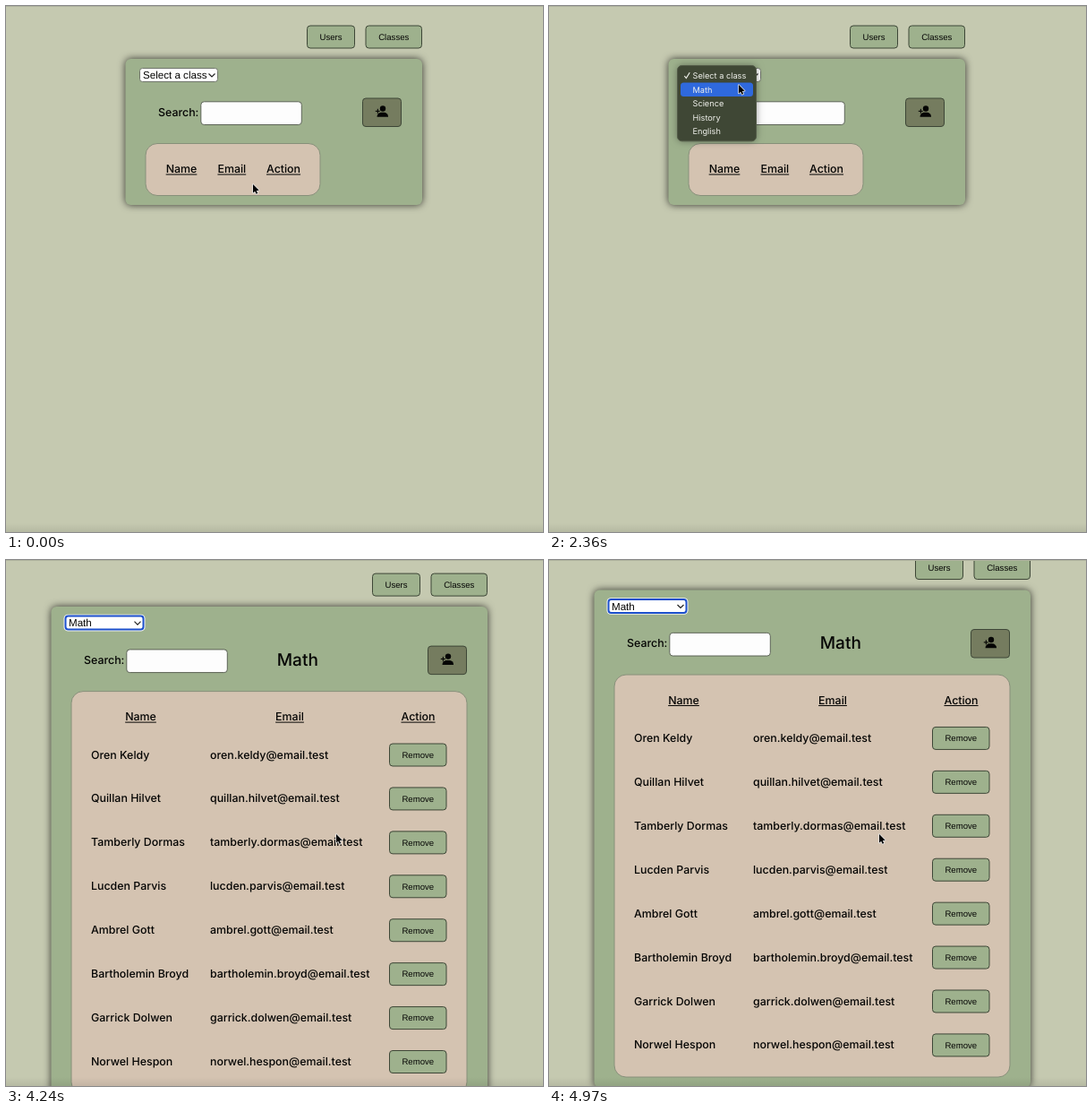
An HTML page with a canvas that plays this animation: 600 px wide and 587 px high, repeating every 5000 ms.

```html
<!DOCTYPE html>
<html lang="en">
<head>
<meta charset="utf-8">
<title>Class list</title>
<style>
  html, body { margin: 0; width: 100%; height: 100%; overflow: hidden; background: #c5c9b0; }
  canvas { display: block; }
</style>
</head>
<body>
<canvas id="stage" width="600" height="587"></canvas>
<script>
const ctx = document.getElementById('stage').getContext('2d');
ctx.textRendering = 'geometricPrecision';
const LOOP = 5000, MENU_OPEN = 700, HOVER = 1900, MENU_CLOSE = 2720, LOADED = 3000;
const GREEN = '#9eb18d', TAN = '#d4c3b1', INK = '#050504', EDGE = '#3d4636';
const ROUND = 'Inter, sans-serif', ARIAL = '"Liberation Sans", Arial, sans-serif';
const BODY = `500 12.4px ${ROUND}`;

const classes = ['Select a class', 'Math', 'Science', 'History', 'English'];
const students = ['Oren Keldy', 'Quillan Hilvet', 'Tamberly Dormas', 'Lucden Parvis',
  'Ambrel Gott', 'Bartholemin Broyd', 'Garrick Dolwen', 'Norwel Hespon'];

// Keys are [time, ...values]
const cursorKeys = [[60, 276, 199], [620, 214, 77], [1790, 214, 77], [2150, 212, 88],
  [3420, 212, 88], [3730, 227, 100], [4130, 369, 306]];
const scrollKeys = [[4130, 0], [4520, 32.5], [4740, 32.7], [5000, 24.7]];

function valueAt(keys, t) {
  const next = keys.findIndex(k => k[0] > t);
  if (next === 0) return keys[0].slice(1);
  if (next < 0) return keys[keys.length - 1].slice(1);
  const a = keys[next - 1], b = keys[next];
  const u = (t - a[0]) / (b[0] - a[0]), e = u * u * (3 - 2 * u);
  return a.slice(1).map((v, i) => v + (b[i + 1] - v) * e);
}

function box(x, y, w, h, r, fill, stroke, line = 1) {
  ctx.beginPath();
  ctx.roundRect(x, y, w, h, r);
  ctx.fillStyle = fill;
  ctx.fill();
  if (!stroke) return;
  ctx.shadowColor = 'transparent';
  ctx.strokeStyle = stroke;
  ctx.lineWidth = line;
  ctx.stroke();
}

function shadowBox(blur, color, ...args) {
  ctx.save();
  ctx.shadowBlur = blur;
  ctx.shadowColor = color;
  box(...args);
  ctx.restore();
}

function text(str, x, y, font, align = 'left', color = INK) {
  ctx.font = font;
  ctx.textAlign = align;
  ctx.fillStyle = color;
  ctx.fillText(str, x, y);
}

function polyline(points, color, width) {
  ctx.beginPath();
  points.forEach(p => ctx.lineTo(...p));
  ctx.strokeStyle = color;
  ctx.lineWidth = width;
  ctx.stroke();
}

function button(label, x, y, w) {
  box(x + .5, y + .5, w - 1, 25, 3.5, GREEN, EDGE);
  text(label, x + w / 2, y + 16.3, `9.6px ${ARIAL}`, 'center');
}

function heading(label, x) {
  text(label, x, 186.3, BODY, 'center');
  const half = ctx.measureText(label).width / 2;
  ctx.fillRect(x - half, 187.5, half * 2, 1);
}

function addButton(x) {
  box(x + .5, 103, 43, 31.5, 3.5, '#757c5f', EDGE);
  ctx.fillStyle = INK;
  ctx.beginPath();
  ctx.arc(x + 23, 114.5, 3.2, 0, 7);
  ctx.fill();
  ctx.beginPath();
  ctx.roundRect(x + 16.5, 118.8, 12.6, 5, [6, 6, 0, 0]);
  ctx.fill();
  ctx.fillRect(x + 14.8, 116.8, 5, 1.1);
  ctx.fillRect(x + 16.8, 114.8, 1.1, 5);
}

function select(x, label, focused) {
  if (focused) box(x - 1.5, 67.7, 91, 18.6, 4.5, '#f4f6f4');
  box(x + .5, 69.5, 87, 15, 3, '#fff', focused ? '#1d50cc' : '#70766b', focused ? 2 : 1);
  text(label, x + 4, 81.2, `11.6px ${ARIAL}`);
  polyline([[x + 77.5, 75.5], [x + 81, 79], [x + 84.5, 75.5]], '#222', 1.2);
}

function page(t) {
  const loaded = t >= LOADED, chosen = t >= MENU_CLOSE;
  const left = loaded ? 50.5 : 133.5, right = loaded ? 538 : 465;
  ctx.save();
  ctx.translate(0, loaded ? -.5 - valueAt(scrollKeys, t)[0] : 0);
  button('Users', right - 129, 21.5, 54);
  button('Classes', right - 63.5, 21.5, 63.5);
  shadowBox(8, 'rgba(0,0,0,.75)', left, 59, right - left, loaded ? 555 : 163, 6, GREEN);
  select(left + 15.5, classes[+chosen], chosen);
  text('Search:', left + 36.5, 122.5, BODY);
  box(left + 84.3, 106.8, 112.5, 25.7, 3.5, '#fdfdfd', '#5c6356');
  addButton(right - 67);
  box(left + 22.5, 153.5, loaded ? 442 : 195, loaded ? 449 : 58, 13, TAN, '#87907a');
  const columns = loaded ? [150.5, 317, 460.5] : [196, 252.3, 310];
  ['Name', 'Email', 'Action'].forEach((label, i) => heading(label, columns[i]));
  if (loaded) {
    text('Math', 325.8, 124.6, `500 19px ${ROUND}`, 'center');
    students.forEach((name, i) => {
      const y = 224.4 + i * 48.93;
      const email = name.toLowerCase().replace(' ', '.') + '@email.test';
      text(name, 95, y + 4, BODY);
      text(email, 228, y + 4, BODY);
      button('Remove', 428, y - 13, 64.5);
    });
  }
  ctx.restore();
}

function menu(t) {
  if (t < MENU_OPEN || t > MENU_CLOSE + 150) return;
  ctx.save();
  ctx.globalAlpha = t < MENU_CLOSE ? 1 : 1 - (t - MENU_CLOSE) / 150;
  shadowBox(9, 'rgba(0,0,0,.4)', 143.5, 66.5, 88, 84.3, 5, '#3f4735', '#535b48');
  if (t >= HOVER) box(147, 85.5, 81, 15.6, 3.5, '#2f69dd');
  classes.forEach((name, i) => text(name, 160.5, 81 + i * 15.5, `9.2px ${ROUND}`, 'left', '#f0f1ec'));
  polyline([[151.3, 78], [153.3, 80.5], [157.2, 74.3]], '#f0f1ec', 1.2);
  ctx.restore();
}

function cursor(t) {
  const arrow = [[0, 0], [0, 9.6], [2.2, 7.7], [3.6, 10.8], [5.2, 10.1], [3.8, 7], [6.7, 6.8]];
  const [x, y] = valueAt(cursorKeys, t);
  ctx.save();
  ctx.translate(x, y);
  ctx.beginPath();
  arrow.forEach(p => ctx.lineTo(...p));
  ctx.closePath();
  ctx.lineJoin = 'round';
  ctx.lineWidth = 1.5;
  ctx.strokeStyle = '#e8e8e8';
  ctx.stroke();
  ctx.fillStyle = '#000';
  ctx.fill();
  ctx.restore();
}

function draw(now) {
  const t = now % LOOP;
  ctx.fillStyle = '#c5c9b0';
  ctx.fillRect(0, 0, 600, 587);
  page(t);
  menu(t);
  ctx.fillStyle = '#afb39d';
  ctx.fillRect(0, 0, 600, 1);
  const fade = ctx.createLinearGradient(0, 577, 0, 587);
  fade.addColorStop(0, 'rgba(0,0,0,0)');
  fade.addColorStop(1, 'rgba(0,0,0,.08)');
  ctx.fillStyle = fade;
  ctx.fillRect(0, 577, 600, 10);
  cursor(t);
}

const start = performance.now();
(function tick() {
  draw(performance.now() - start);
  requestAnimationFrame(tick);
})();
</script>
</body>
</html>
```
